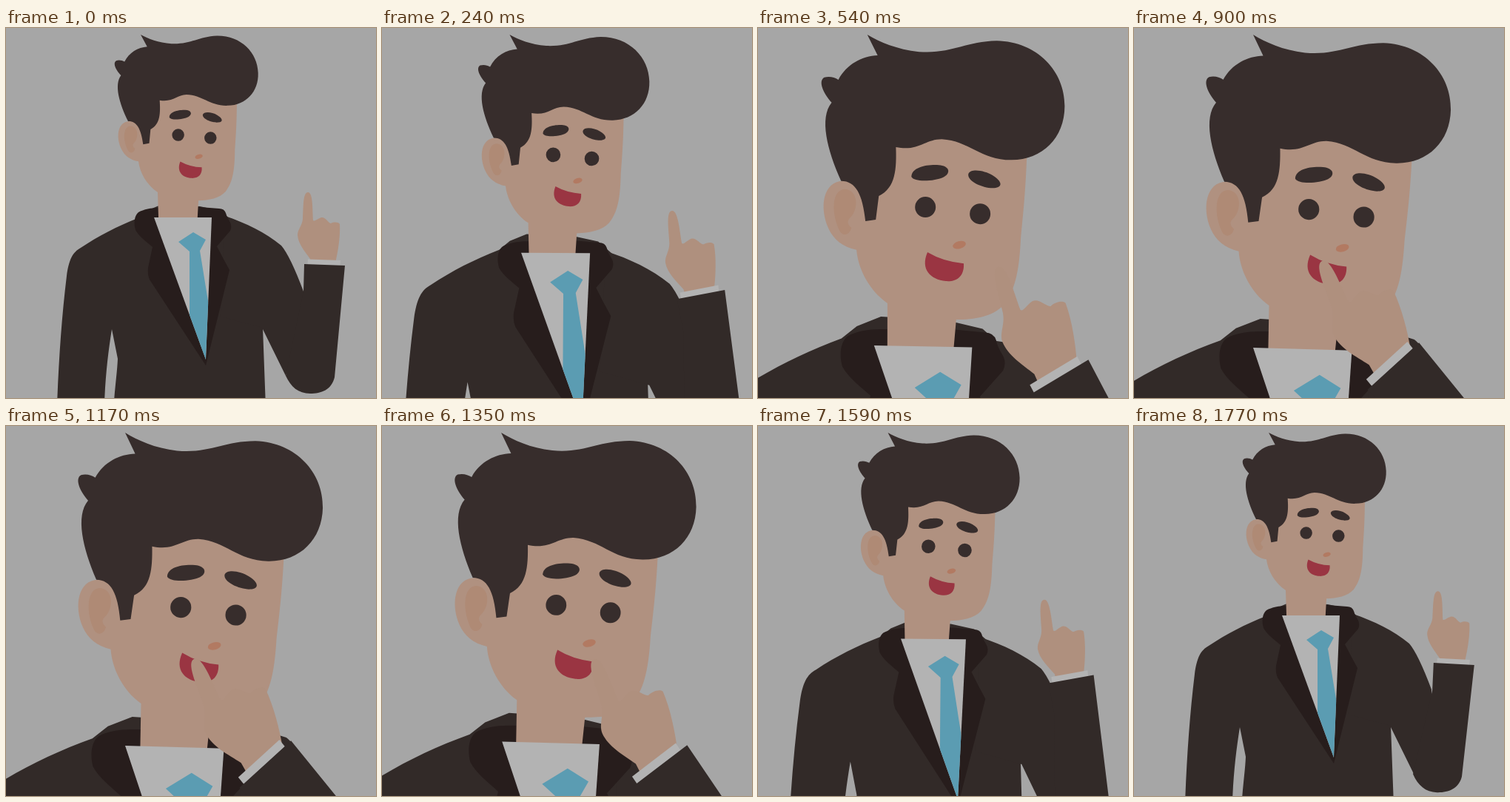
Recreate the animation shown at these times as an HTML page. Size 500 by 500 pixels, loop 2.25 s.

```html
<!DOCTYPE html>
<html lang="en">
<head>
<meta charset="utf-8">
<title>Finger to the mouth</title>
<style>
  html, body { margin: 0; width: 100%; height: 100%; overflow: hidden; background: #a6a6a6; }
  svg { display: block; width: 100vw; height: 100vh; }
  .suit { fill: #322a28; }
  .lapel { fill: #271d1c; }
  .hair { fill: #372d2c; }
  .skin { fill: #b09180; }
  .hand { fill: #af907e; }
  .ear { fill: #af8a75; }
  .nose { fill: #b27a62; }
  .mouth { fill: #9a3542; }
  .shirt { fill: #b3b3b3; }
  .tie { fill: #5b9cb2; }
</style>
</head>
<body>
<svg viewBox="0 0 500 500">
  <clipPath id="vee"><path d="M200 256H278L270 448Z"/></clipPath>

  <g class="body">
    <path class="suit" id="jacket" d="M190 247L209 239L262 241L290 247L340 290L347 405L352 540H144
      C145 500 150 470 151 447L143 407C137 445 133 480 132 540H68
      C70 470 74 400 82 335C85 313 90 303 101 297C125 281 150 268 178 257Z"/>
    <path class="suit" id="upper"/>
    <path class="lapel" d="M207 243C196 243 186 245 179 249C174 253 172 262 175 273C180 282 190 289 198 296
      L192 324Q191 333 194 340L270 456L302 327Q293 311 285 295L303 274Q306 267 302 261Q298 255 297 250
      Q295 244 288 244L262 242Z"/>
  </g>

  <g id="head">
    <path class="skin" d="M112 140H340L363 172C361 230 357 260 355 285C353 330 347 356 331 375
      C317 390 292 394 268 394L263 452H175V372C150 355 135 325 133 300
      C114 296 102 286 95 271C82 242 88 208 114 207Z"/>
    <path class="ear" d="M117 218C136 219 136 246 124 257C119 262 122 267 126 270
      C124 281 113 283 109 272C99 250 99 219 117 218Z"/>
    <path class="hair" d="M147 9C164 19 187 29 217 32C262 35 278 18 322 17C377 18 414 58 414 105
      C414 148 384 178 342 178C300 178 285 152 248 150C225 150 217 167 186 161
      C187 190 186 216 163 227L159 259L145 261C141 225 132 207 112 207
      C93 165 82 122 99 101C88 89 80 72 89 67C96 65 103 67 108 70C119 49 140 38 161 37Z"/>
    <path class="hair" d="M207 201C207 188 228 184 244 185C258 186 261 195 251 201C239 207 211 209 207 201Z"/>
    <path class="hair" d="M284 197C287 189 306 192 317 199C330 207 331 215 319 216C305 217 282 207 284 197Z"/>
    <circle class="hair" cx="226" cy="242" r="14"/>
    <circle class="hair" cx="300" cy="251" r="14"/>
    <ellipse class="nose" cx="272" cy="293" rx="9" ry="5" transform="rotate(-15 272 293)"/>
    <path class="mouth" d="M229 303Q251 316 278 318C279 335 269 343 254 342C233 340 219 326 229 303Z"/>
  </g>

  <g class="body">
    <path class="shirt" d="M200 256H278L270 448Z"/>
    <path class="tie" clip-path="url(#vee)" d="M253 276L270 286L262 301L274 375L270 450H248V302L233 289Z"/>
    <g id="arm">
      <path class="hand" id="hand" d="M413 328L411 312C404 302 395 292 394 280C394 272 400 268 401 258
        C402 242 401 222 408 222C415 222 414 245 415 260C417 262 420 258 426 256
        C432 255 435 263 439 264C443 262 449 262 451 265C452 280 449 300 446 313L445 328Z"/>
      <path class="shirt" d="M408 312.500L452 314L451 324H407Z"/>
      <path class="suit" d="M403 319L458 321L444 472C440 489 426 494 411 494C395 494 385 485 378 470L402 356Z"/>
    </g>
  </g>
</svg>
<script>
  const LOOP = 2250, STEP = 30, LAST = 1770;

  const $ = id => document.getElementById(id);
  const bodies = document.querySelectorAll('.body');
  const place = (el, transform) => el.setAttribute('transform', transform);
  const lerp = (a, b, u) => a + (b - a) * u;
  const part = (t, from, to) => Math.min(1, Math.max(0, (t - from) / (to - from)));
  const ease = (t, from, to) => (1 - Math.cos(Math.PI * part(t, from, to))) / 2;
  const bump = (t, from, to) => Math.sin(Math.PI * part(t, from, to)) ** 2;
  const reachOut = (t, from, to) => Math.sin(Math.PI / 2 * part(t, from, to)) ** 1.4;

  // Shoulder line, from relaxed (0) to raised (1)
  function shoulder(u) {
    const pt = (x0, y0, x1, y1) => lerp(x0, x1, u) + ' ' + lerp(y0, y1, u);
    return `M${pt(296, 254, 293, 247)}C${pt(325, 264, 304, 242)} ${pt(350, 276, 317, 243)} ` +
      `${pt(372, 294, 327, 246)}Q${pt(384, 308, 334, 251)} ${pt(402, 356, 342, 266)}` +
      'L402 400L378 470L346 405L290 390Z';
  }

  function draw(t) {
    const rise = ease(t, 55, 585);
    const near = rise - ease(t, 1305, 1700);
    const nod = rise - ease(t, 1340, 1740);   // the head settles back a little later
    const lean = bump(t, 100, 900);
    const reach = reachOut(t, 0, 900) - 1.03 * ease(t, 1230, 1800);
    const shrug = 1 - (1 - near) ** 4;
    const zoom = 1 + .712 * near;

    const body = `translate(${200 - 39 * near - 5 * lean} ${256 + 176 * near})
      rotate(${1.6 * nod - .4 * lean}) scale(${zoom}) translate(-200 -256)`;
    bodies.forEach(b => place(b, body));
    place($('jacket'), `translate(${-4 * shrug} ${-6 * shrug})`);
    place($('head'), `translate(${182 - 21 * nod - 14 * lean} 9)
      rotate(${2.8 * nod - .9 * lean - 1.75}) scale(${zoom / 1.7}) translate(-147 -9)`);

    const elbowX = reach * (40 - 46 * reach), elbowY = -reach * (53 + 32 * reach);
    place($('arm'), `translate(${elbowX} ${elbowY}) rotate(${-46 * reach} 412 470)`);
    place($('hand'), `rotate(${22 * reach} 430 326)`);
    $('upper').setAttribute('d', shoulder(reach ** 2));
  }

  const start = performance.now();
  function tick() {
    const t = (performance.now() - start) % LOOP;
    draw(Math.min(LAST, Math.floor(t / STEP) * STEP));
    requestAnimationFrame(tick);
  }
  tick();
</script>
</body>
</html>
```
